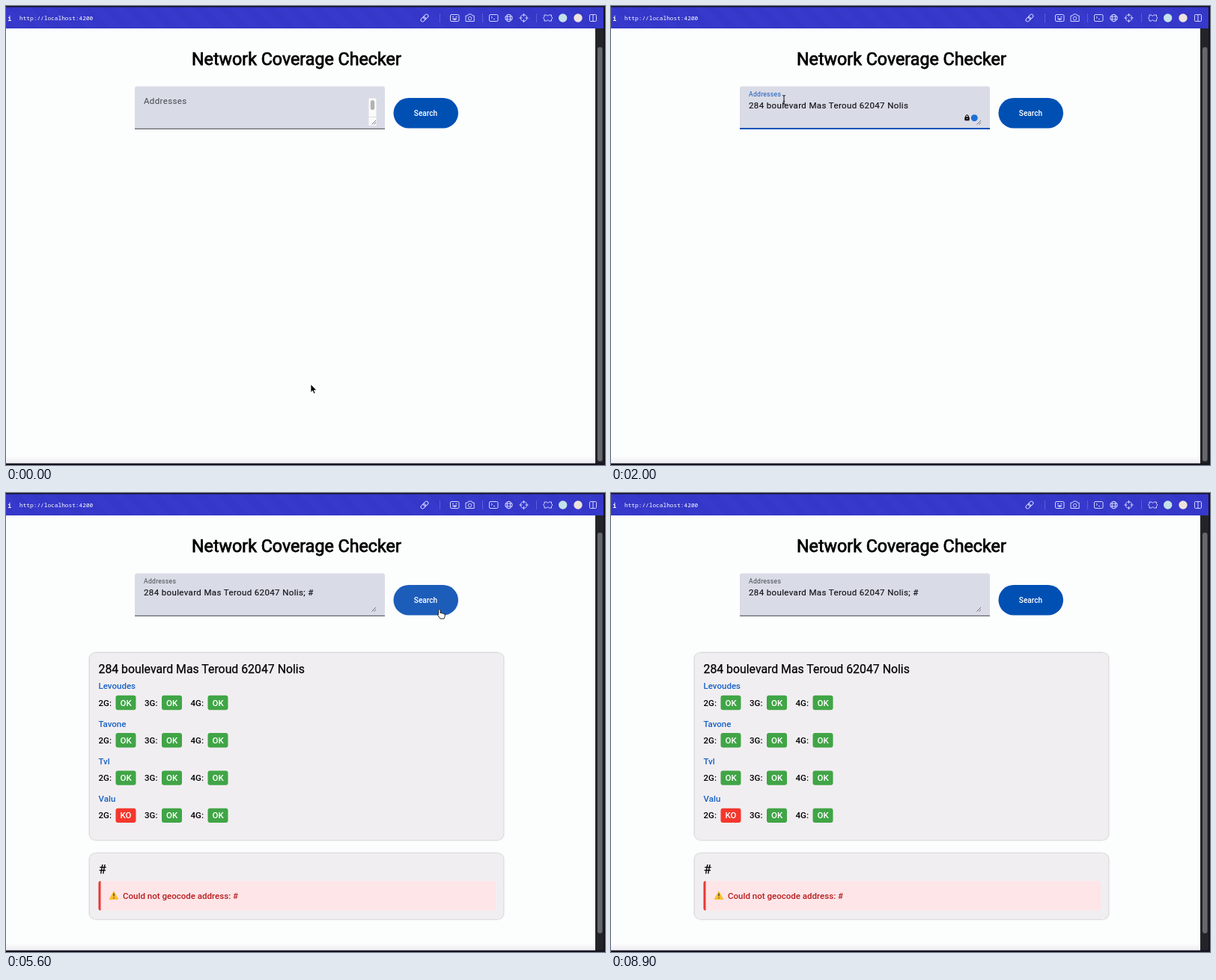
Recreate the animation shown at these times as an HTML page. Size 800x614 px, loop 9000 ms.

```html
<!DOCTYPE html>
<html lang="en">
<head>
<meta charset="utf-8">
<title>Network Coverage Checker</title>
<style>
  html, body { margin: 0; height: 100%; overflow: hidden; background: #15121f; }
  svg { display: block; }
  text { font: 11.52px Roboto, sans-serif; white-space: pre; }
  .field { letter-spacing: .36px; fill: #1c1d22; }
  .entry { fill: #101116; stroke: #101116; stroke-width: .15; }
  .medium { font-weight: 500; }
  .white { fill: #fff; }
  .heading { font-size: 15.84px; fill: #000; stroke: #000; stroke-width: .25; }
  .icons { fill: none; stroke: #d3d6ff; stroke-width: 1; }
  .card { fill: #f1eef1; filter: drop-shadow(0 .7px .6px #0005) drop-shadow(0 .7px 1px #0003); }
</style>
</head>
<body>
<svg width="800" height="614" viewBox="0 0 800 614">
  <defs>
    <pattern id="stripes" width="22" height="22" patternUnits="userSpaceOnUse" patternTransform="rotate(-45)">
      <rect width="22" height="22" fill="#3639cb"/>
      <rect width="11" height="22" fill="#3437c7"/>
    </pattern>
    <linearGradient id="fade" x2="0" y2="1">
      <stop stop-color="#fcfdfd"/><stop offset="1" stop-color="#eeedf3"/>
    </linearGradient>
  </defs>

  <!-- browser chrome -->
  <rect y="1.5" width="798" height="28.5" fill="url(#stripes)"/>
  <rect y="30" width="787" height="581.5" fill="#fcfdfd"/>
  <rect y="602" width="787" height="9.5" fill="url(#fade)"/>
  <rect x="787" y="30" width="11" height="581.5" fill="#232427"/>
  <rect id="thumb" x="790" width="6.5" rx="3.2" fill="#66686c"/>
  <g class="white">
    <text x="2.2" y="19.5" style="font:bold 8.5px 'Noto Sans Mono',monospace">i</text>
    <text x="18" y="19" style="font:7.8px 'Noto Sans Mono',monospace">http://localhost:4200</text>
  </g>
  <g class="icons">
    <path stroke="#5a5ddb" d="M579.5 10v12M636.5 10v12M708.5 10v12"/>
    <g transform="rotate(-45 559 16)">
      <rect x="553" y="13.7" width="7" height="4.6" rx="2.3"/>
      <rect x="558" y="13.7" width="7" height="4.6" rx="2.3"/>
    </g>
    <rect x="593.5" y="11.5" width="11.5" height="9" rx="1.5"/>
    <path d="M596 14.5h2m2.5 0h2M596.5 17q2.7 3 5.5 0z" fill="#d3d6ff"/>
    <path d="M614 13h2.5l1.2-2h4l1.2 2h2.3v7.5h-11.2z"/><circle cx="619.6" cy="16.5" r="2.2"/>
    <rect x="645.5" y="11.5" width="11.5" height="9" rx="1.5"/><path d="M648 14l1.6 1.3-1.6 1.3M651 17.5h2"/>
    <circle cx="671.5" cy="16" r="4.7"/><ellipse cx="671.5" cy="16" rx="2.2" ry="4.7"/>
    <path d="M667 14.3h9M667 17.7h9"/>
    <circle cx="691.5" cy="16" r="4.3"/><path d="M691.5 10v4m0 4v4M685.5 16h4m4 0h4"/>
    <path d="M719 12h2.5q2 2.6 4 0h3v2.4q3 1.6 0 3.2v2.4h-3q-2-2.6-4 0h-2.5v-2.4q-3-1.6 0-3.2z"/>
    <rect x="779.5" y="11.5" width="9" height="9" rx="1.2"/><path d="M784 11.5v9"/>
  </g>
  <circle cx="743.7" cy="16" r="5.7" fill="#c4e2ea"/>
  <circle cx="764" cy="16" r="5.7" fill="#eee3dc"/>

  <!-- search form -->
  <text x="248" y="78.5" stroke="#000" stroke-width=".75" style="font-size:23.25px">Network Coverage Checker</text>
  <path d="M172 164.5v-54q0-3 3-3h328q3 0 3 3v54z" fill="#d9dbe6"/>
  <rect x="172" y="163.8" width="334" height="1" fill="#44474e"/>
  <rect id="line" y="163" height="2" fill="#0a52b8"/>
  <text id="label" class="field">Addresses</text>
  <g id="hint">
    <text class="field" x="184" y="137" style="fill:#3d4048">Enter multiple addresses separated by commas,</text>
    <text id="sample" class="field" x="184" y="154.3" style="fill:#3d4048"></text>
  </g>
  <g id="bar">
    <rect x="484.5" y="123.5" width="10" height="36.5" fill="#fafafa"/>
    <rect x="486.8" y="126" width="5.4" height="13" rx="2.7" fill="#b2b2b4"/>
    <path d="M484.5 148.5h10" stroke="#ddd"/>
  </g>
  <path d="M488.5 158.5l5.5-5.5M491.5 158.5l2.5-2.5" stroke="#55575e" stroke-width=".8"/>
  <text id="entry" class="field entry" x="184" y="137"></text>
  <rect id="caret" y="126.5" width="1" height="13" fill="#1459bd"/>
  <g id="keys">
    <rect x="472.3" y="148.5" width="6.4" height="4.7" rx="1"/>
    <path d="M473.7 149v-1.5q1.8-3.5 3.6 0v1.5" fill="none" stroke="#000" stroke-width="1.1"/>
    <circle cx="475.5" cy="150.8" r=".8" fill="#fff"/>
    <circle cx="485.3" cy="149.8" r="4.5" fill="#1f6fd2"/>
  </g>
  <rect id="button" x="517.5" y="123" width="86.5" height="40.5" rx="20.25"/>
  <text class="medium white" x="544.8" y="146.6" style="font-size:10.08px">Search</text>
  <g id="tip">
    <path d="M475 139.5h11l-5.5 5.5z"/>
    <rect x="430.5" y="120.5" width="100" height="19.7" rx="5"/>
    <text class="white" x="438.5" y="134" style="font:10.15px 'Liberation Sans',sans-serif">Unlock 7Hushdoor</text>
  </g>

  <!-- results -->
  <g id="results">
    <rect class="card" x="111.3" y="213.5" width="553.5" height="250.7" rx="8.6"/>
    <text id="place" class="heading" x="123.5" y="241.2"></text>
    <g id="rows"></g>
    <rect class="card" x="111.3" y="481.7" width="553.5" height="88.5" rx="8.6"/>
    <text class="heading" x="124" y="508.5">#</text>
    <rect x="123.5" y="519" width="530.5" height="39.5" rx="3" fill="#fde5e8"/>
    <path d="M126.5 519v39.5q-3 0-3-3v-33.5q0-3 3-3z" fill="#e53935"/>
    <path d="M144 533.5l5.3 9.7h-10.6z" fill="#fbc02d" stroke="#fbc02d" stroke-width="1.5" stroke-linejoin="round"/>
    <path d="M144 535.5v4m0 1.5v1.3" stroke="#333" stroke-width="1.3"/>
    <text class="medium" x="156" y="542.7" fill="#b71c1c">Could not geocode address: #</text>
  </g>

  <!-- pointers -->
  <path id="arrow" d="M0 0v11l2.5-2.3 1.7 3.9 1.9-.8-1.7-3.8h3.5z" stroke="#fff" stroke-width=".8"/>
  <path id="beam" d="M-2-5.5q2 0 2 1.2 0-1.2 2-1.2M0-4.5v10M-2 6.5q2 0 2-1.2 0 1.2 2 1.2M-1.2 2.5h2.4" fill="none" stroke="#111"/>
  <path id="hand" d="M-1.2 1q1.2-2 2.4 0v4l1.5-.3 .8.8 1.4-.2.7.8q1.7-.2 1.7 1.2v2.2l-1.2 3h-5l-3.6-5q.2-1.8 1.3-.7z" fill="#fff" stroke="#111" stroke-width=".9" stroke-linejoin="round"/>
</svg>
<script>
const $ = id => document.getElementById(id);
const set = (id, attrs) => { for (const k in attrs) $(id).setAttribute(k, attrs[k]); };
const show = (id, on) => { $(id).style.display = on ? '' : 'none'; };
const clamp = v => Math.max(0, Math.min(1, v));
const mix = (a, b, p) => a + (b - a) * p;

const address = '284 boulevard Mas Teroud 62047 Nolis';
const LOOP = 9000, STEP = 100;
const FOCUS = 600, PASTE = 1400, BLUR = 5200, RESULTS = 5600, LEAVE = 8600;
// When the entry changes, and what it then holds
const edits = [[FOCUS, ''], [PASTE, address], [2700, address + ';'], [3200, address + '; '], [4000, address + '; #']];
// Pointer stops: time, x, y
const stops = [
  [100, 407, 506], [600, 223, 116], [700, 223, 116], [1000, 231, 125], [4100, 231, 125],
  [4800, 584, 156], [5300, 584, 156], [6000, 571, 155], [6800, 571, 155],
  [7000, 330, 534], [7500, 260, 579], [8000, 310, 552], [LEAVE, 700, 0]
];

$('sample').textContent = `e.g., ${address}, 8 chemin`;
$('place').textContent = address;
$('rows').innerHTML = ['Levoudes', 'Tavone', 'Tvl', 'Valu'].map((name, row) => {
  const y = row * 50.3;
  const badges = [2, 3, 4].map((gen, col) => {
    const x = 123.5 + col * 61.5, ok = row < 3 || col > 0;
    return `<text class="medium" x="${x}" y="${284.5 + y}">${gen}G:</text>
      <rect x="${x + 23}" y="${270.8 + y}" width="27" height="19.4" rx="3" fill="${ok ? '#40a546' : '#f4372d'}"/>
      <text class="medium white" x="${x + 29}" y="${284.5 + y}">${ok ? 'OK' : 'KO'}</text>`;
  });
  return `<text class="medium" x="123.5" y="${262.2 + y}" fill="#1762c4">${name}</text>${badges.join('')}`;
}).join('');

function pointerAt(t) {
  const i = stops.findIndex(s => s[0] > t);
  if (i < 0) return stops.at(-1).slice(1);
  if (!i) return stops[0].slice(1);
  const [t0, x0, y0] = stops[i - 1], [t1, x1, y1] = stops[i];
  let p = (t - t0) / (t1 - t0);
  p *= p * (3 - 2 * p);
  return [mix(x0, x1, p), mix(y0, y1, p)];
}

function drawPointer(t) {
  const [x, y] = pointerAt(t);
  const inRow = y > 107 && y < 164;
  const onButton = inRow && x > 517 && x < 604;
  const onField = inRow && x > 172 && x < 506 && t >= 800;
  const kind = onButton ? 'hand' : onField ? 'beam' : 'arrow';
  const visible = t < LEAVE && !(t >= 2600 && t < 4100);
  for (const id of ['arrow', 'beam', 'hand']) show(id, visible && id === kind);
  set(kind, { transform: `translate(${x} ${y})` });
  set('button', { fill: onButton ? '#1c5db9' : '#0050b4' });
}

function drawField(t) {
  const focused = t >= FOCUS && t < BLUR;
  const p = clamp((t - FOCUS - 15) / 150);
  const [since, value] = edits.findLast(e => e[0] <= t) || [0, ''];
  $('entry').textContent = value;
  set('label', { transform: `translate(184 ${mix(131.4, 121.2, p)}) scale(${mix(1, .75, p)})` });
  $('label').style.fill = focused ? (p < 1 ? '#34599f' : '#1459bd') : '#44474e';
  set('line', { x: 339 - 167 * p, width: focused ? 334 * p : 0 });
  set('caret', { x: 184 + (value ? $('entry').getComputedTextLength() : 0) });
  show('caret', focused && (t - since) % 1000 < 500);
  show('hint', t >= FOCUS && t < PASTE);
  show('bar', t < PASTE);
  show('tip', t >= 700 && t < 1100);
  show('keys', focused && t >= PASTE);
}

function draw(now) {
  const t = Math.floor(now % LOOP / STEP) * STEP;
  const done = t >= RESULTS;
  drawField(t);
  drawPointer(t);
  show('results', done);
  set('thumb', { y: done ? 53 : 55, height: done ? 536 : 554 });
  requestAnimationFrame(draw);
}
draw(performance.now());
</script>
</body>
</html>
```
